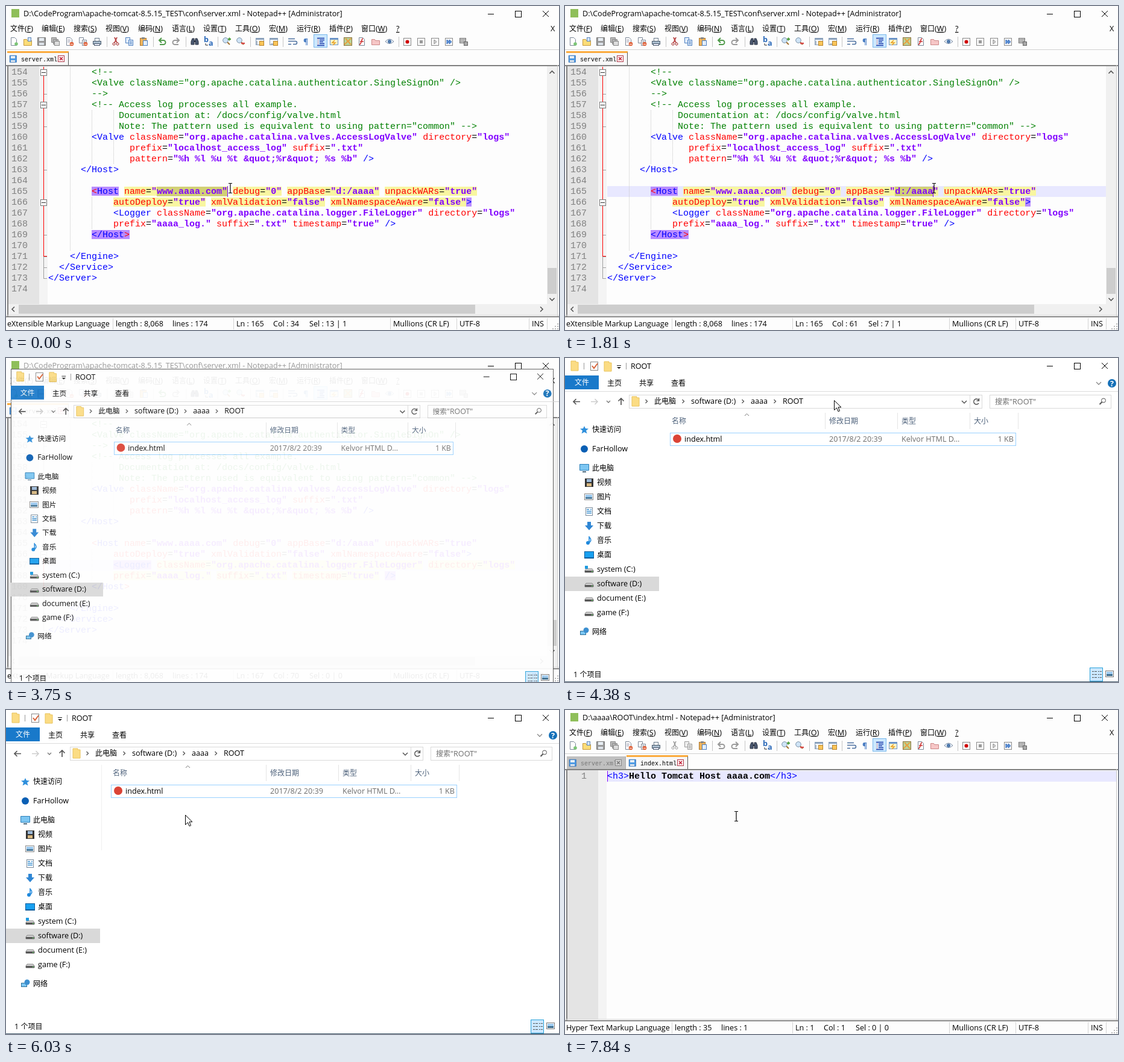
An HTML page for the animation above (8000 ms loop, 917 by 538 pixels).

```html
<!DOCTYPE html>
<html lang="zh-CN">
<head>
<meta charset="utf-8">
<style>
html,body{margin:0;width:100%;height:100%;overflow:hidden;background:#fff}
svg{display:block;width:100%;height:100%}
text{font:12.6px "Open Sans","Noto Sans CJK SC",sans-serif;white-space:pre}
.z{font:12px "Noto Sans CJK SC",sans-serif}
.b,.b .z{font-weight:bold}
.m{font:15px "Liberation Mono",monospace}
.tab{font:10px "Liberation Mono",monospace}
.v{fill:#8000ff;font-weight:bold}.t{fill:#00f}.a{fill:#f00}.c{fill:#008000}
rect,.e{shape-rendering:crispEdges}
</style>
</head>
<body>
<svg id="stage" viewBox="0 0 917 538"></svg>
<script>
(() => {
const esc = s => s.replace(/&/g, '&amp;').replace(/</g, '&lt;').replace(/>/g, '&gt;');
const ui = s => esc(s)
  .replace(/[\u3000-\u9fff]+/g, '<tspan class="z">$&</tspan>')
  .replace(/~(.)/g, '<tspan text-decoration="underline">$1</tspan>');
const T = (x, y, s, a = '') => `<text x="${x}" y="${y}" ${a}>${ui(s)}</text>`;
const R = (x, y, w, h, f, a = '') => `<rect x="${x}" y="${y}" width="${w}" height="${h}" fill="${f}" ${a}/>`;
const B = (x, y, w, h, f, s, a = '') => R(x + .5, y + .5, w - 1, h - 1, f, `stroke="${s}" ${a}`);
const D = (d, s, f = 'none', w = 1, a = '') => `<path d="${d}" stroke="${s}" fill="${f}" stroke-width="${w}" ${a}/>`;
const C = (x, y, r, f, s = 'none') => `<circle cx="${x}" cy="${y}" r="${r}" fill="${f}" stroke="${s}"/>`;
const G = (x, y, s) => `<g transform="translate(${x} ${y})">${s}</g>`;
const flip = s => `<g transform="matrix(-1 0 0 1 16 0)">${s}</g>`;
const fill = c => `fill="${c}"`;

// ---- editor window ----
const controls = D('M799 13.5h10', '#000') + B(844, 8, 11, 11, 'none', '#000') + D('M890 8l10 10M900 8l-10 10', '#000');

const page = (c = '#7a8696', f = '#fff') => D('M3.5 1.5h6l3 3v10h-9z', c, f);
const pages = (c, f) => D('M1.5 1.5h7v9h-7z', c, f) + D('M6.5 5.5h7v9h-7z', c, f) + D('M8 8h4M8 10h4M8 12h4', c);
const floppy = (c, f) => D('M1.5 1.5h13v13h-13z', c, f) + R(4, 2, 8, 5, '#e8eef4') + R(4, 10, 8, 4, '#dde3ea');
const folder = D('M1.5 4.5h5l1 2h7v8h-13z', '#c79a3d', '#fbdc78');
const scissors = c => D('M6 1l4 9M10 1L6 10', c, 'none', 1.6) + C(5, 12, 2, 'none', c) + C(11, 12, 2, 'none', c);
const turn = c => D('M4 13h6a3.5 3.5 0 0 0 0-7H3M7 2L3 6l4 4', c, 'none', 2);
const lens = s => D('M9 9l4 4', '#a07030', 'none', 2) + C(6, 6, 4.3, '#cfe4f6', '#7c92a8') + s;
const win = (c, f) => B(1, 2, 14, 12, f, c) + R(1, 2, 14, 3, c);
const synced = d => win('#8aa0ba', '#f4f8fc') + B(7, 7, 8, 8, '#fbc65a', '#b8832a') + D(d, '#6c7e94');
const box = s => B(1, 2, 13, 13, '#f8f8f8', '#8a8a8a') + s;
const minus = C(12, 12, 3.3, '#e0623a') + R(10, 11.5, 4, 1, '#fff');
const off = '#9a9a9a';

function toolbar(undo, id) {
  const items = [
    [13, page() + C(12, 12, 2.8, '#7cc576')],
    [36, folder + B(8, 1, 6, 7, '#cfe2f8', '#5f87b8')],
    [59, floppy('#777', off)],
    [82, D('M1.5 1.5h8v8h-8zM4.5 4.5h8v8h-8z', '#888', '#bbb') + B(6, 7, 9, 8, '#ddd', '#888')],
    [105, page() + D('M5 5h5M5 7h5M5 9h4', '#aab') + minus],
    [128, pages('#7a8696', '#fff') + minus],
    [151, B(4, 2, 8, 6, '#fff', '#678') + B(1, 7, 14, 6, '#a9bccd', '#4a5a6c') + B(3, 11, 10, 4, '#eef', '#4a5a6c')],
    [182, scissors(off)], [205, pages(off, '#eee')],
    [228, B(2, 2, 11, 13, '#f0b45c', '#a8752f') + R(5, 1, 5, 3, '#888') + B(7, 6, 8, 9, '#e4effc', '#4d7fc0')],
    [259, turn(undo)], [282, flip(turn(off))],
    [313, D('M2 8l2-5h3v10H2zM14 8l-2-5H9v10h5z', '#2a3342', '#4a5870') + R(7, 6, 2, 3, '#2a3342')],
    [336, T(0, 9, 'b', 'fill="#2968b8" class="b"') + T(8, 15, 'a', 'fill="#2968b8" class="b"') + D('M3 11v3h4', '#333')],
    [366, lens(D('M10 4h5M12.5 1.5v5', '#4a9c3a', 'none', 2))],
    [389, lens(D('M9 11h6', '#d84a4a', 'none', 2.4))],
    [421, synced('M3 7v6')], [444, synced('M3 12h4')],
    [475, D('M1 3.5h11M1 7.5h12a2 2 0 0 1 0 5H9M1 12.5h5', '#4a6e9e', 'none', 1.4)],
    [497, T(4, 13, '¶', 'fill="#4c7fc4" class="b"')],
    [522, R(-3.5, -3.5, 22, 21, '#cce8ff', 'stroke="#78b8ec"') + D('M2 2.5h12M6 5.5h8M6 8.5h6M6 11.5h8M2 14.5h12', '#1838a8', 'none', 1.6) + D('M3.5 4v9', '#e55', 'none', 1, 'stroke-dasharray="1 1"')],
    [544, win('#6a93c8', '#fff4c8') + D('M9 6l-4 4h5l-4 4', '#e8a020', 'none', 1.5)],
    [567, B(1, 1, 14, 14, '#b9d49a', '#8a7038') + D('M2 13L13 3M4 3l9 10', '#e8a040', 'none', 2)],
    [590, page() + D('M10 3c-3 0-2 9-6 10M5 8h6', '#c33', 'none', 1.6)],
    [613, D('M1.5 4.5h5l1 2h7v7h-13z', '#c88', '#f6c6c6')],
    [636, D('M1 8q7-8 14 0q-7 7-14 0z', '#7a8aa0', '#eef4fa') + C(8, 8, 3, '#4f79ac')],
    [666, box(C(7.5, 8.5, 3, '#d00000'))], [689, box(R(5, 6, 5, 5, '#999'))],
    [712, box(D('M6 5l4 3.5-4 3.5z', '#888', '#ddd'))],
    [735, box(D('M4 5l4 3.5L4 12zM8 5l4 3.5L8 12z', '#2a62b8', '#6aa0e0'))],
    [759, B(1, 2, 11, 9, '#ccc', '#777') + D('M2 5h9M2 8h9', '#888') + B(8, 8, 7, 7, '#aaa', '#666')]
  ];
  const seps = [167, 244, 298, 351, 405, 459, 651].map(x => R(x, 51, 1, 17, '#c4c4c4')).join('');
  const live = id ? `<g id="${id}">${G(174, 51, scissors('#c04040'))}${G(197, 51, pages('#4d7fc0', '#e4effc'))}</g>` : '';
  return seps + items.map(([x, s]) => G(x - 8, 51, s)).join('') + live;
}

const menus = [[7, '文件(~F)'], [59, '编辑(~E)'], [112, '搜索(~S)'], [165, '视图(~V)'], [219, '编码(~N)'], [275, '语言(~L)'],
  [327, '设置(~T)'], [380, '工具(~O)'], [436, '宏(~M)'], [482, '运行(~R)'], [536, '插件(~P)'], [589, '窗口(~W)'], [647, '~?'], [903, 'X']];

function tab(x, w, name, active) {
  return R(x, active ? 75 : 77, w, 23, active ? '#f8f8f8' : '#c0c0c0') +
    (active ? R(x, 75, w, 3, '#faaa3c') : '') + R(x + w - 1, 77, 1, 21, active ? '#555' : '#aaa') +
    G(x + 3, 81, `<g transform="scale(.85)">${floppy('#2d6cb4', '#4f9be4')}</g>`) +
    T(x + 23, 92, name, `class="tab" ${fill(active ? '#000' : '#777')}`) +
    B(x + w - 18, 82, 11, 11, active ? '#fff4f4' : '#d4d4d4', active ? '#b23a4a' : '#888') +
    D(`M${x + w - 15} 85l5 5m0-5l-5 5`, active ? '#c02038' : '#777', 'none', 1.6);
}

function frameOf(title, titleId, lang, tabs, tools) {
  return R(0, 0, 917, 538, '#fdfdfd') + R(9, 5, 13, 14, '#8fbf5a') +
    T(29, 17, title, `id="${titleId}"`) + controls +
    menus.map(([x, s]) => T(x, 42, s)).join('') + tools +
    R(0, 72, 917, 1, '#d0d0d0') + tabs +
    R(0, 98, 917, 2, '#808080') + R(2, 98, 2, 417, '#808080') + R(914, 98, 1, 417, '#c8c8c8') +
    R(4, 100, 51, 414, '#e4e4e4') + R(55, 100, 14, 414, '#f4f4f4') +
    R(0, 513, 917, 1, '#d8d8d8') + R(0, 515, 917, 2, '#8a8a8a') +
    [177, 377, 637, 747, 867, 897].map(x => R(x, 518, 1, 19, '#d4d4d4')).join('') +
    T(2, 532, lang) + T(642, 532, 'Mullions (CR LF)') + T(752, 532, 'UTF-8') + T(872, 532, 'INS') +
    [[914, 528], [914, 532], [914, 536], [910, 532], [910, 536], [906, 536]].map(([x, y]) => R(x, y - 1, 2, 2, '#bbb')).join('');
}

// ---- code ----
const code = `8|<!--
8|<Valve className="org.apache.catalina.authenticator.SingleSignOn" />
8|-->
8|<!-- Access log processes all example.
13|Documentation at: /docs/config/valve.html
13|Note: The pattern used is equivalent to using pattern="common" -->
8|<Valve className="org.apache.catalina.valves.AccessLogValve" directory="logs"
15|prefix="localhost_access_log" suffix=".txt"
15|pattern="%h %l %u %t &quot;%r&quot; %s %b" />
6|</Host>
0|
8|<Host name="www.aaaa.com" debug="0" appBase="d:/aaaa" unpackWARs="true"
12|autoDeploy="true" xmlValidation="false" xmlNamespaceAware="false">
12|<Logger className="org.apache.catalina.logger.FileLogger" directory="logs"
12|prefix="aaaa_log." suffix=".txt" timestamp="true" />
8|</Host>
0|
4|</Engine>
2|</Service>
0|</Server>
0|`.split('\n').map(s => s.split(/\|(.*)/)).map(([n, s]) => ({ col: +n, s: s || '' }));
const first = 154;
const rowY = n => 101 + 18 * (n - first);
const colX = c => 70 + 9 * c;
const span = (cls, s) => `<tspan class="${cls}">${esc(s)}</tspan>`;

function paint(s, n) {
  if (n < 160) return span('c', s);
  return s.replace(/"[^"]*"|<\/?\w*|\/?>|\w+(?==)/g, w => {
    if (w[0] === '"') return span('v', w);
    if (n === 165 && w[0] === '<') return span('a', '<') + span('t', w.slice(1));
    if (n === 169 && w === '>') return span('a', w);
    return span(/[<>]/.test(w) ? 't' : 'a', w);
  });
}
const mono = (x, y, html, a = '') => `<text class="m" x="${x}" y="${y}" ${a}>${html}</text>`;
const codeText = code.map(({ col, s }, i) => {
  const n = first + i, y = rowY(n) + 13;
  return mono(9, y, n, fill('#808080')) + mono(colX(col), y, paint(s, n));
}).join('');

function mark(...rows) {
  return rows.map(n => {
    const { col, s } = code[n - first];
    const put = (re, c) => [...s.matchAll(re)].map(m => R(colX(col + m.index), rowY(n) + 1, 9 * m[0].length, 15, c)).join('');
    return put(/\w+="[^"]*"/g, '#f8f6a0') + put(/<\/?\w+>?|\/?>/g, '#b98cff');
  }).join('');
}
const guide = (c, a, b) => D(`M${colX(c) + .5} ${rowY(a)}V${rowY(b + 1)}`, '#c4c4c4', 'none', 1, 'class="e" stroke-dasharray="1 1"');
const folds = R(62, 101, 1, 351, '#a0a0a0') + [156, 159, 163, 169, 171, 172, 173].map(n => R(62, rowY(n) + 9, 6, 1, '#a0a0a0')).join('') +
  '<g id="fold"><rect x="62" width="1" fill="#f00"/><rect x="62" width="6" height="1" fill="#f00"/></g>' +
  [154, 157, 166].map(n => B(57, rowY(n) + 4, 11, 11, '#fff', '#777') + R(59, rowY(n) + 9, 7, 1, '#333')).join('');

const bars = R(897, 100, 17, 395, '#f0f0f0') + R(4, 495, 910, 18, '#f0f0f0') + R(898, 435, 15, 43, '#cdcdcd') + R(21, 496, 757, 15, '#cdcdcd') +
  D('M901.5 112l4-4 4 4M901.5 485l4 4 4-4M14 499.5l-4 4 4 4M886 499.5l4 4-4 4', '#555', 'none', 1.6);

const serverDoc = frameOf('D:\\CodeProgram\\apache-tomcat-8.5.15_TEST\\conf\\server.xml - Notepad++ [Administrator]', 'title',
  'eXtensible Markup Language', tab(2, 102, 'server.xml', true), toolbar('#4f9a4a', 'clip')) +
  '<rect id="line" x="70" width="827" height="18" fill="#e8e8ff"/>' +
  `<g id="hostTag">${mark(165, 166, 169)}</g><g id="logTag">${mark(167, 168)}</g>` +
  '<rect id="sel" height="16" fill="#d2d076"/>' +
  guide(4, 154, 170) + guide(8, 158, 162) + guide(12, 158, 162) + guide(8, 166, 168) +
  folds + codeText + '<rect id="caret" width="1" height="18" fill="#8000ff"/>' + bars +
  T(182, 532, 'length : 8,068') + T(276, 532, 'lines : 174') +
  T(382, 532, '', 'id="ln"') + T(443, 532, '', 'id="col"') + T(503, 532, '', 'id="cnt"');

const indexDoc = frameOf('D:\\aaaa\\ROOT\\index.html - Notepad++ [Administrator]', 'title2', 'Hyper Text Markup Language',
  tab(3, 98, 'server.xml', false) + tab(102, 102, 'index.html', true), toolbar(off)) +
  R(70, 101, 844, 18, '#e8e8ff') + R(70, 101, 1, 18, '#8000ff') + mono(27, 114, '1', fill('#808080')) +
  mono(70, 114, span('t', '<h3>') + '<tspan font-weight="bold">Hello Tomcat Host aaaa.com</tspan>' + span('t', '</h3>')) +
  T(182, 532, 'length : 35') + T(259, 532, 'lines : 1') + T(382, 532, 'Ln : 1') + T(429, 532, 'Col : 1') + T(482, 532, 'Sel : 0 | 0');

// ---- file window ----
const yellow = (x, y) => D(`M${x} ${y}h8v2h4v14h-12z`, '#e8c25a', '#fbdc84');
const chev = (x, y) => D(`M${x - 1.5} ${y - 3}l3 3-3 3`, '#555', 'none', 1.3);
const monitor = D('M.5 1.5h15v10H.5z', '#2d7fb8', '#7cc6f2') + R(5, 13, 6, 1.5, '#4a6a80');
const drive = D('M3 7h10l2 3v3H1v-3z', '#888', '#d0d0d0') + R(1, 10, 14, 3, '#555') + R(12, 11, 2, 1, '#7f7');
const nav = [
  [118, 0, '快速访问', D('M8 2l2 4 5 .5-4 3 1.5 5L8 12l-4.5 2.5L5 9.5 1 6.5 6 6z', 'none', '#2f90dc')],
  [150, 0, 'FarHollow', C(8, 8, 6, '#0a5fb4')],
  [182, 0, '此电脑', monitor],
  [206, 1, '视频', R(1, 1, 14, 14, '#333') + R(4, 2, 8, 5, '#9ab8d8') + R(4, 9, 8, 5, '#d8b880')],
  [230, 1, '图片', B(0, 2, 15, 11, '#fff', '#888') + R(2, 4, 11, 4, '#9ccaf0') + R(2, 8, 11, 3, '#4a7a9a')],
  [254, 1, '文档', B(2, 1, 12, 14, '#fff', '#7a8a9a') + D('M4 4.5h4M4 7.5h8M4 10.5h8M10 4.5h2', '#3a8fd0', 'none', 1.5)],
  [278, 1, '下载', D('M5 1h6v6h4l-7 8-7-8h4z', 'none', '#2f86d4')],
  [302, 1, '音乐', D('M8 1v11q5-4 1-9', '#1e88dc', 'none', 1.6) + C(6, 12, 3, '#1e88dc')],
  [326, 1, '桌面', B(0, 2, 16, 12, '#18a0f0', '#0a5c9c') + R(1, 12, 14, 1, '#0a5c9c')],
  [350, 1, 'system (C:)', drive + R(1, 2, 5, 5, '#1e9be0')],
  [374, 1, 'software (D:)', drive], [398, 1, 'document (E:)', drive], [422, 1, 'game (F:)', drive],
  [454, 0, '网络', B(1, 6, 10, 7, '#7cc6f2', '#2d6f98') + C(11, 5, 4.5, '#3c8fd0')]
];
const dim = fill('#6d6d6d'), head = fill('#4c607a');

const explorer = R(0, 0, 917, 538, '#fff', 'id="pane"') + yellow(10, 5) + yellow(65, 6) + R(31, 8, 1, 11, '#999') + R(101, 8, 1, 11, '#999') +
  B(42, 6, 13, 15, '#fff', '#888') + D('M45 13l3 4 6-8', '#d8643a', 'none', 2) + D('M86 12.5h7', '#222') + D('M86 15h7l-3.5 3z', 'none', '#222') +
  T(109, 18, 'ROOT') + controls +
  R(0, 29, 56, 23, '#1979ca') + T(16, 45, '文件', fill('#fff')) + T(70, 46, '主页') + T(123, 46, '共享') + T(176, 46, '查看') +
  D('M881 40l4 4 4-4', '#888', 'none', 1.3) + C(907, 42, 7, '#1470b8') + T(904, 46.5, '?', 'fill="#fff" class="b"') + R(0, 55, 917, 1, '#dcdcdc') +
  D('M25 72.5H14M18.5 68l-4.5 4.5 4.5 4.5M93 78V67M88.5 71.5L93 67l4.5 4.5', '#555', 'none', 1.7) +
  D('M43 72.5h11M49.5 68l4.5 4.5-4.5 4.5', '#ccc', 'none', 1.5) + D('M69 71l3 3 3-3', '#777', 'none', 1.3) +
  B(106, 61, 586, 23, '#fff', '#d9d9d9') + '<rect id="crumb" y="62" height="21" fill="#e5f3ff" stroke="#cce8ff"/>' +
  yellow(111, 64) + [135, 196, 295, 348].map(x => chev(x, 72)).join('') +
  T(148, 76, '此电脑') + T(209, 76, 'software (D:)') + T(308, 76, 'aaaa') + T(361, 76, 'ROOT') +
  D('M658 71l4 4 4-4', '#555', 'none', 1.5) + R(671, 62, 1, 21, '#d9d9d9') + D('M686 70a4.5 4.5 0 1 0 0 5M686.5 67v4h-4', '#555', 'none', 1.4) +
  B(704, 61, 202, 23, '#fff', '#d9d9d9') + T(713, 77, '搜索"ROOT"', dim) + C(893, 70.5, 3.5, 'none', '#555') + D('M890.5 73l-4 4', '#555', 'none', 2) +
  D('M298 96l3.5-3.5 3.5 3.5', '#777') + [431, 551, 671, 751].map(x => R(x, 91, 1, 27, '#e5e5e5')).join('') +
  T(177, 109, '名称', head) + T(438, 109, '修改日期', head) + T(558, 109, '类型', head) + T(678, 109, '大小', head) +
  R(158, 91, 1, 142, '#f0f0f0', 'id="divider"') +
  B(174, 124, 574, 22, '#fff', '#99d1ff', 'id="row"') + C(186, 134, 7, '#db4437') + T(198, 139, 'index.html') +
  T(438, 139, '2017/8/2 20:39', dim) + T(558, 139, 'Kelvor HTML D...', dim) + T(744, 139, '1 KB', dim + ' text-anchor="end"') +
  R(0, 363, 156, 24, '#d9d9d9') +
  nav.map(([y, sub, s, icon]) => G(24 + 8 * sub, y - 7, icon) + T(45 + 8 * sub, y + 5, s)).join('') +
  T(14, 530, '1 个项目') + `<g id="picked">${T(82, 530, '选中 1 个项目')}${T(165, 530, '35 字节')}</g>` +
  B(870, 514, 22, 23, '#cce8ff', '#26a0da') + [520, 525, 530].map(y => D(`M874 ${y}.5h3m1 0h4m2 0h2m1 0h3`, '#555')).join('') +
  B(896, 519, 14, 11, '#fff', '#777') + R(898, 521, 10, 4, '#9ccaf0') + R(898, 525, 10, 3, '#3a6a8a') + R(0, 537, 917, 1, '#4a6070');

const entries = [[146, '打开(O)'], [169, 'Edit with Notepad++'], [192, '使用 Mullions Warder扫描...'], [215, '打开方式(H)'], [238, '添加到 "index.rar"(T)'],
  [268, '通过VV/LOM发送到'], [298, '还原以前的版本(V)'], [328, '发送到(N)'], [358, '剪切(T)'], [381, '复制(C)'],
  [411, '创建快捷方式(S)'], [434, '删除(D)'], [457, '重命名(M)'], [487, '属性(R)']];
const menu = R(234, 133, 285, 373, '#000', 'opacity=".35"') + R(234, 133, 284, 372, '#666', 'opacity=".5"') + B(231, 130, 286, 374, '#f0f0f0', '#a0a0a0') +
  '<rect id="hover" x="234" width="279" height="23" fill="#d8d8d8"/>' +
  [253, 283, 313, 343, 396, 472].map(y => R(242, y, 264, 1, '#989898')).join('') +
  entries.map(([y, s], i) => T(266, y + 5, s, i ? '' : 'class="b"')).join('') +
  R(243, 162, 14, 15, '#8fbf5a') + R(242, 182, 20, 20, '#0078d7') + R(243, 231, 14, 15, '#8a3a6a') +
  D('M498 209l5 6-5 6', '#1070b8', 'none', 1.3) + D('M498 322l5 6-5 6', '#a02840', 'none', 1.3);

const pointer = D('M.5.5v16l4-3.7 2.5 6 2.5-1-2.5-6h5z', '#000', '#fff');
const beam = D('M-3-7.5h2.5l.5.5.5-.5H3M-3 8.5h2.5l.5-.5.5.5H3M0-7V8', '#000', 'none', 1.2);
const ring = C(13, 1, 7, '#2a8ad6') + C(13, 1, 6, 'none', '#7cc4f4') + C(13, 1.5, 3, '#fff');

const stage = document.getElementById('stage');
stage.innerHTML = `<g id="server">${serverDoc}</g><g id="files">${explorer}</g><g id="menu">${menu}</g><g id="index">${indexDoc}</g>` +
  `<g id="mouse"><g id="beam">${beam}</g><g id="pointer">${pointer}</g><g id="ring">${ring}</g></g>`;
const $ = Object.fromEntries([...stage.querySelectorAll('[id]')].map(e => [e.id, e]));
const show = (e, on) => { e.style.display = on ? '' : 'none'; };
const set = (e, o) => { for (const k in o) e.setAttribute(k, o[k]); };

// start, end, steps, x, y
const moves = [
  [300, 720, 4, 600, 345], [1000, 1280, 3, 528, 303], [1420, 1810, 4, 612, 302],
  [2090, 2370, 3, 691, 345], [2510, 2930, 4, 560, 570], [4000, 4380, 4, 446, 70],
  [4530, 4660, 2, 495, 100], [4810, 5070, 3, 378, 74], [5200, 5730, 5, 236, 72],
  [5880, 6030, 2, 297, 174], [6160, 6160, 1, 232, 131], [6860, 7400, 5, 283, 174], [7840, 7840, 1, 284, 176]
];
function mouseAt(t) {
  let x = 372, y = 302;
  for (const [a, b, n, tx, ty] of moves) {
    if (t < a) break;
    const i = n > 1 ? Math.min(n - 1, Math.floor((t - a) / ((b - a) / (n - 1)) + 1e-6)) : 0;
    const k = (i + 1) / n;
    x += (tx - x) * k;
    y += (ty - y) * k;
  }
  return [x, y];
}
const crumbs = [[144, 46], [205, 84], [304, 37], [357, 44]];

function editor(t, x) {
  const drag = t >= 1420 && t < 2370;
  const line = t < 860 || drag ? 165 : 167;
  const count = t < 860 ? 13 : drag ? Math.min(7, Math.round((x - 549) / 9)) : 0;
  const from = t < 860 ? 20 : drag ? 53 : t < 1420 ? 59 : 69;
  const col = from + count;
  set($.line, { y: rowY(line) });
  show($.line, t >= 860);
  set($.sel, { x: colX(from), y: rowY(line) + 1, width: 9 * count });
  set($.caret, { x: colX(col), y: rowY(line) });
  show($.caret, t < 3230);
  show($.hostTag, line === 165);
  show($.logTag, line === 167);
  show($.clip, count > 0);
  const [y0, y1] = line === 165 ? [101, 415] : [326, 380];
  const [v, h] = $.fold.children;
  set(v, { y: y0, height: y1 - y0 });
  set(h, { y: y1 });
  $.ln.textContent = 'Ln : ' + line;
  $.col.textContent = 'Col : ' + (col + 1);
  $.cnt.textContent = `Sel : ${count} | ${count ? 1 : 0}`;
  set($.title, { fill: t < 3630 ? '#000' : '#999' });
}

function files(t, x, y) {
  const opening = t < 3870;
  set($.files, {
    transform: t < 3750 ? 'translate(22 40) scale(.952 .94)' : opening ? 'translate(8 18) scale(.981 .977)' : 'translate(0 0)',
    opacity: t < 3750 ? .5 : opening ? .93 : 1
  });
  set($.pane, { stroke: opening ? '#555' : 'none' });
  const inBar = t >= 4000 && y > 61 && y < 84;
  const hit = inBar && crumbs.find(([a, w]) => x >= a && x < a + w);
  show($.crumb, hit);
  if (hit) set($.crumb, { x: hit[0], width: hit[1] });
  show($.divider, t >= 5880);
  set($.row, { fill: t < 6160 ? '#fff' : t < 6430 ? '#e5f3ff' : '#cce8ff' });
  show($.picked, t >= 6430);
  const item = entries.find(([c]) => x > 234 && Math.abs(y - c) <= 11.5);
  show($.hover, item);
  if (item) set($.hover, { y: item[0] - 11 });
}

const start = performance.now();
function draw() {
  const t = (performance.now() - start) % 8000;
  const [x, y] = mouseAt(t);
  const shown = t >= 3630 && t < 7840, last = t >= 7840;
  show($.server, t < 3870);
  show($.files, shown);
  show($.menu, t >= 6430 && t < 7690);
  show($.index, last);
  editor(t, x);
  if (shown) files(t, x, y);
  const text = !shown && y > 100 && y < 495;
  show($.beam, text);
  show($.pointer, !text);
  show($.ring, t >= 7540 && !last);
  set($.mouse, { transform: `translate(${Math.round(x)} ${Math.round(y)})` });
  requestAnimationFrame(draw);
}
draw();
})();
</script>
</body>
</html>
```
